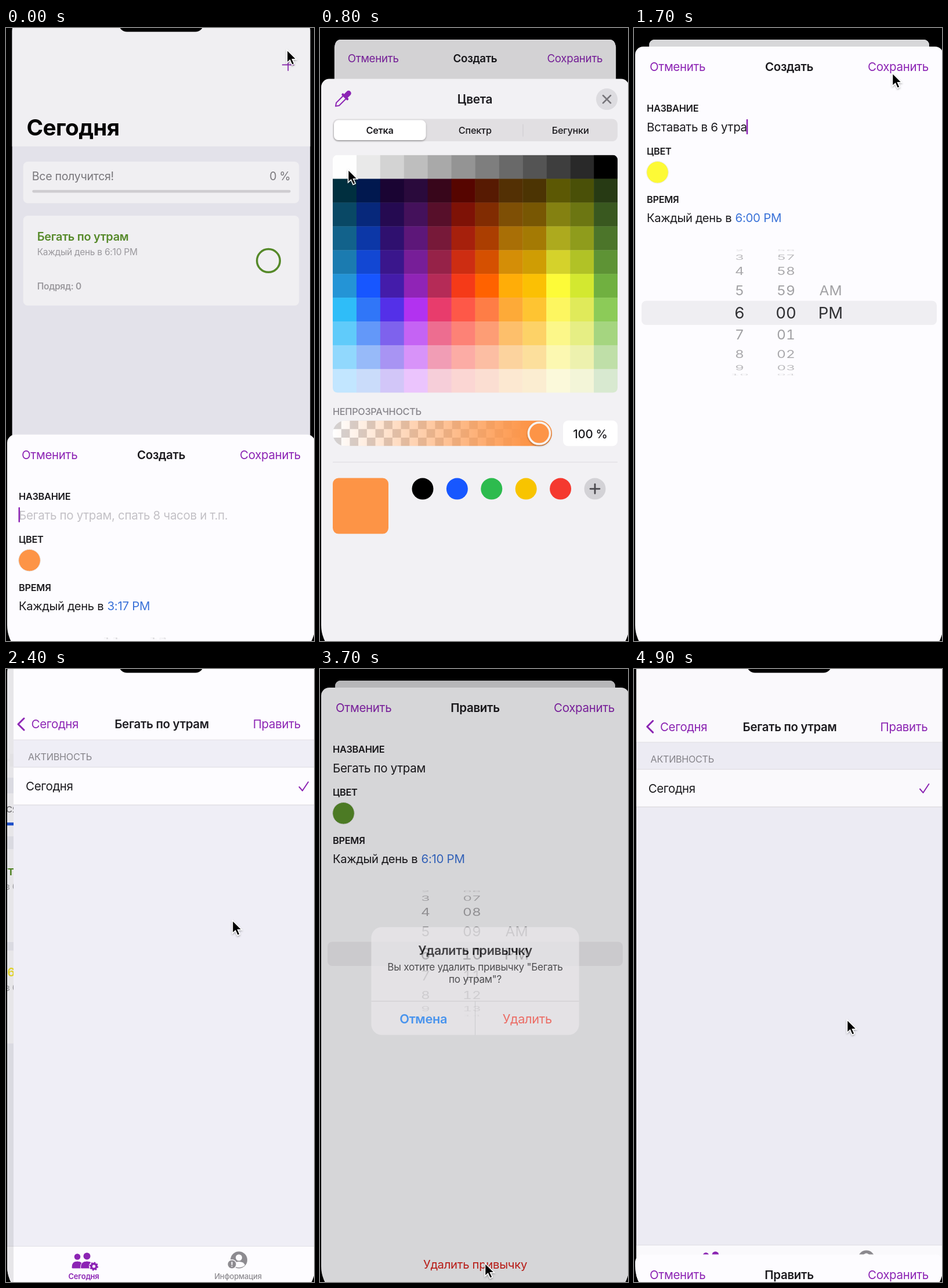
These frames come from a looping animation (531 by 1055 pixels, 5 s). An HTML page:

```html
<!DOCTYPE html>
<html lang="ru">
<head>
<meta charset="utf-8">
<title>Трекер привычек</title>
<style>
html, body { margin: 0; width: 100%; height: 100%; overflow: hidden; background: #000; }
svg { display: block; width: 100%; height: 100%; }
text { font-family: Inter, Roboto, sans-serif; letter-spacing: -.015em; white-space: pre; }
.wheel text { font-variant-numeric: tabular-nums; letter-spacing: 0; }
</style>
</head>
<body>
<svg viewBox="0 0 531 1055">
  <defs>
    <clipPath id="screen"><rect x="2" y="-50" width="531" height="1138" rx="60"/></clipPath>
    <clipPath id="grid"><rect x="22" y="131" width="491" height="409" rx="8"/></clipPath>
    <clipPath id="slider"><rect x="22" y="588" width="378" height="44" rx="22"/></clipPath>
    <pattern id="checker" x="22" y="588" width="29.4" height="29.4" patternUnits="userSpaceOnUse">
      <path fill="#fff" d="M0 0h30v30H0z"/>
      <path fill="#d3d1d2" d="M0 0h14.7v14.7H0zM14.7 14.7h14.7v14.7H14.7z"/>
    </pattern>
    <filter id="shadow" x="-50%" y="-50%" width="200%" height="200%">
      <feDropShadow dx="0" dy="1.5" stdDeviation="1.5" flood-opacity=".35"/>
    </filter>
  </defs>
  <g id="stage"></g>
</svg>
<script>
const LOOP = 5000, STEP = 100, MID = 267.5, WIDTH = 531;
const WHITE = '#fdfcff', PAGE = '#efeef6', INK = '#1b1a1e', PURPLE = '#8c24b4', BLUE = '#3a72d8';
const GREEN = '#5a902b', ORANGE = '#fd9446', YELLOW = '#fdfa36', GREY = '#86848a';
const HABIT = 'Бегать по утрам', NEW_HABIT = 'Вставать в 6 утра';
const stage = document.getElementById('stage');

const clamp = v => Math.max(0, Math.min(1, v));
const smooth = v => (v = clamp(v), v * v * (3 - 2 * v));
const mix = (a, b, k) => a + (b - a) * k;
const settle = (t, start) => t < start ? 0 : 1 - Math.exp(-.026 * (t - start));
const shown = (t, start, end) => settle(t, start) * (1 - settle(t, end));

const rect = (x, y, w, h, fill, r = 0, more = '') =>
  `<rect x="${x}" y="${y}" width="${w}" height="${h}" rx="${r}" fill="${fill}" ${more}/>`;
const circle = (x, y, r, fill, more = '') => `<circle cx="${x}" cy="${y}" r="${r}" fill="${fill}" ${more}/>`;
const line = (d, color, width, more = '') =>
  `<path d="${d}" fill="none" stroke="${color}" stroke-width="${width}" stroke-linecap="round" stroke-linejoin="round" ${more}/>`;
const group = (more, ...parts) => `<g ${more}>${parts.join('')}</g>`;
const move = (x, y, s = 1) => `transform="translate(${x} ${y}) scale(${s})"`;
// y is the middle of the capital letters
const text = (x, y, str, size, fill, weight = 400, anchor = 'start', more = '') =>
  `<text x="${x}" y="${y + size * .364}" font-size="${size}" fill="${fill}" font-weight="${weight}" text-anchor="${anchor}" ${more}>${str}</text>`;
const shade = (opacity, width = WIDTH + 4) => rect(0, -60, width, 1260, '#000', 0, `opacity="${opacity}"`);

function habitCard(y, name, time, color, done) {
  const mark = done ? line(`M449 ${y + 81}l7 7l13 -15`, '#fff', 3.5) : '';
  return rect(22, y, 491, 160, WHITE, 8) +
    text(46.7, y + 37.5, name, 20.5, color, 600) +
    text(46.7, y + 64, `Каждый день в ${time}`, 16, '#a3a1a6') +
    text(46.7, y + 125.5, `Подряд: ${done ? 1 : 0}`, 16, '#a3a1a6', 600) +
    circle(458.5, y + 80, 20.5, done ? color : 'none', `stroke="${color}" stroke-width="3.6"`) + mark;
}

function today(t, push) {
  const added = t >= 1800, done = t >= 2100;
  return rect(2, -50, WIDTH, 1200, PAGE) + rect(2, -50, WIDTH, 237, WHITE) +
    group(`opacity="${1 - push}"`,
      line('M483.5 42h20M493.5 32v20', PURPLE, 1.8),
      text(28, 153, 'Сегодня', 40, '#050505', 700)) +
    rect(22, 214, 491, 74, WHITE, 8) +
    text(37.5, 240, 'Все получится!', 20.2, '#7f7d82') +
    text(497.6, 240, done ? '50 %' : '0 %', 20.2, '#7f7d82', 400, 'end') +
    rect(38, 264.3, 460, 5, '#d9d7db', 2.5) +
    (done ? rect(38, 264.3, 230, 5, '#1f55dd', 2.5) : '') +
    habitCard(310, HABIT, '6:10 PM', GREEN, done) +
    (added ? habitCard(484.5, NEW_HABIT, '6:00 PM', '#f4e52c', false) : '');
}

function detail(k) {
  const content = rect(2, -50, WIDTH, 1200, PAGE) + rect(2, -50, WIDTH, 172, WHITE) +
    rect(2, 121.5, WIDTH, 1, '#e2e0e6') +
    text(27, 151, 'АКТИВНОСТЬ', 16.2, GREY) +
    rect(2, 169, WIDTH, 65, WHITE) + rect(2, 168.5, WIDTH, 1, '#dddbe1') + rect(2, 233.5, WIDTH, 1, '#d8d6dc') +
    text(23, 202, 'Сегодня', 20.5, INK) + line('M494.5 203l5.5 6.5l10 -15', PURPLE, 2);
  const nav = line('M31 85l-10 10l10 10', PURPLE, 3) + text(43.5, 95, 'Сегодня', 20.5, PURPLE) +
    text(268.5, 95, HABIT, 20.5, INK, 600, 'middle') + text(508, 95, 'Править', 20.5, PURPLE, 400, 'end');
  return group(move((1 - k) * WIDTH, 0), content) + group(`opacity="${k}"`, nav);
}

function tabBar() {
  const person = (x, y, r, w) => circle(x, y, r, PURPLE) +
    `<path fill="${PURPLE}" stroke="${WHITE}" d="M${x - w} 1030q0 -11 ${w} -11t${w} 11q0 2 -2 2h${4 - 2 * w}q-2 0 -2 -2z"/>`;
  return rect(2, 993, WIDTH, 100, WHITE) + rect(2, 993, WIDTH, .8, '#dcdae0') +
    person(123, 1011.5, 5.3, 10) + person(139.5, 1010.5, 6, 11) +
    circle(151.5, 1028, 8.5, WHITE) +
    circle(151.5, 1028, 4.4, 'none', `stroke="${PURPLE}" stroke-width="3.6"`) +
    circle(151.5, 1028, 6.6, 'none', `stroke="${PURPLE}" stroke-width="2" stroke-dasharray="2.6 2.58"`) +
    circle(401.5, 1017, 14.5, '#8d8b90') + circle(401.5, 1013, 5.5, WHITE) +
    `<path fill="${WHITE}" d="M391 1026q2 -6 10.5 -6t10.5 6q-4 4 -10.5 4t-10.5 -4z"/>` +
    circle(389.5, 1024.5, 8.5, WHITE) + circle(389.5, 1024.5, 7, '#8d8b90') +
    line('M389.5 1021v4M389.5 1028v.1', WHITE, 2) +
    text(134, 1045, 'Сегодня', 13, PURPLE, 600, 'middle') +
    text(400, 1045, 'Информация', 13, '#8d8b90', 500, 'middle');
}

function wheel(x, value, label) {
  let out = '';
  for (let i = Math.ceil(value - 4.3); i <= value + 4.3; i++) {
    const str = label(i), angle = (i - value) * .36, near = Math.abs(i - value) < .5;
    if (!str) continue;
    const squash = Math.max(0, Math.cos(angle));
    out += `<g transform="translate(${x} ${458 + 108 * Math.sin(angle)}) scale(1 ${squash})" opacity="${near ? 1 : .46 * Math.sqrt(squash)}">` +
      text(0, 0, str, near ? 27.5 : 24.5, '#303033', 400, 'middle') + '</g>';
  }
  return group('class="wheel"', out);
}

const wrap = (n, size) => ((n % size) + size) % size;
const hourLabel = n => String(wrap(n - 1, 12) + 1);
const minuteLabel = n => String(wrap(n, 60)).padStart(2, '0');

function form({ title, name, color, hour, minute, caret, removable }) {
  const time = `${hourLabel(Math.round(hour))}:${minuteLabel(Math.round(minute))} PM`;
  return rect(2, 0, WIDTH, 1250, WHITE, 14) +
    text(27, 35, 'Отменить', 20.5, PURPLE) + text(MID, 35, title, 20.5, INK, 600, 'middle') +
    text(508, 35, 'Сохранить', 20.5, PURPLE, 400, 'end') +
    text(22, 106, 'НАЗВАНИЕ', 16.3, INK, 600) +
    (name ? text(22, 139, name, 20.5, INK, 400, 'start', 'id="name"')
          : text(22, 139, 'Бегать по утрам, спать 8 часов и т.п.', 20.5, '#c3c1c6')) +
    (caret ? rect(21.5, 125, 2.5, 26, PURPLE, 1, 'id="caret"') : '') +
    text(22, 180, 'ЦВЕТ', 16.3, INK, 600) + circle(40.5, 216.3, 18.8, color, 'stroke="#e9e7ec"') +
    text(22, 263, 'ВРЕМЯ', 16.3, INK, 600) +
    text(22, 295, 'Каждый день в', 20.2, INK) + text(174.5, 295, time, 20.5, BLUE) +
    rect(13, 437.5, 509, 41.5, '#efeef2', 8) +
    wheel(182, hour, hourLabel) + wheel(262, minute, minuteLabel) +
    wheel(339, 1, i => ['AM', 'PM'][i]) +
    (removable ? text(MID, 993, 'Удалить привычку', 20.3, '#d8211b', 400, 'middle') : '');
}

// Swatch anchors: each palette row blends between the nearest two.
const anchors = [
  [1, '002f3f 01184f 1a0433 2a0a3c 38061b 560500 571a02 533004 4c3403 5c5804 4a5008 273a14'],
  [5, '2494d6 1756ff 441caa 9024b6 b52b57 f53a18 ff6200 ffad08 fbc004 fdfb38 d3e830 70b040'],
  [6, '2fbdf8 3076f8 5430e8 b232f0 e83c6c fe5848 fe7d46 fdaa38 fec432 fdf660 e0ea5a 8ccb58'],
  [9, 'c2e6ff cadcfa d2c6f8 ebc4fd f6ced9 fbd6d3 fbded2 fce8d1 fbedd1 fbf9da f3f5d8 d8e9d0']
].map(([row, list]) => ({ row, colors: list.split(' ').map(c => [0, 2, 4].map(i => parseInt(c.slice(i, i + 2), 16))) }));

function swatch(col, row) {
  if (!row) {
    const v = col === 11 ? 0 : 254 - 21.3 * col;
    return `rgb(${v},${v},${v})`;
  }
  const next = Math.max(1, anchors.findIndex(a => a.row >= row));
  const a = anchors[next - 1], b = anchors[next], k = (row - a.row) / (b.row - a.row);
  return `rgb(${a.colors[col].map((v, i) => Math.round(mix(v, b.colors[col][i], k)))})`;
}

const cell = 491 / 12;
let palette = '';
for (let row = 0; row < 10; row++)
  for (let col = 0; col < 12; col++)
    palette += rect(22 + col * cell, 131 + row * cell, cell + .4, cell + .4, swatch(col, row));

function colorPicker(color) {
  const saved = ['#000', '#1757ff', '#2dbb4e', '#f8c400', '#f5392f', '#d3d2d6'];
  return rect(2, 0, WIDTH, 1250, '#f2f1f4', 14) +
    group(`transform="translate(39 35) rotate(45)"`,
      rect(-4.5, -19, 9, 14, PURPLE, 4.5), rect(-7.5, -8, 15, 4, PURPLE, 2),
      line('M-3.5 -4v16l3.5 5l3.5 -5v-16', PURPLE, 2)) +
    text(267, 35, 'Цвета', 20.8, INK, 600, 'middle') +
    circle(494.5, 35, 18.5, '#dddce0') + line('M488 28.5l13 13M501 28.5l-13 13', '#77757a', 2.8) +
    rect(22, 69, 491, 38.5, '#e1dfe2', 9) +
    rect(24, 71, 158.5, 34.5, '#fff', 8, 'filter="url(#shadow)"') + rect(349.5, 78, 1, 21, '#cbc9ce') +
    ['Сетка', 'Спектр', 'Бегунки'].map((s, i) => text(103 + 164.3 * i, 88, s, 16.3, INK, i ? 500 : 600, 'middle')).join('') +
    group('clip-path="url(#grid)"', palette) +
    text(22, 572, 'НЕПРОЗРАЧНОСТЬ', 16.2, GREY, 500) +
    `<linearGradient id="alpha"><stop stop-color="${color}" stop-opacity="0"/><stop offset=".9" stop-color="${color}"/></linearGradient>` +
    group('clip-path="url(#slider)"', rect(22, 588, 378, 44, 'url(#checker)'), rect(22, 588, 378, 44, 'url(#alpha)')) +
    circle(378, 610, 18.5, color, 'stroke="#f7f3f2" stroke-width="3.5" filter="url(#shadow)"') +
    rect(419, 588, 94, 44, '#fff', 9) + text(466, 610.5, '100 %', 20.5, INK, 500, 'middle') +
    rect(22, 659, 491, 1, '#dcdadf') + rect(22, 687, 96, 96, color, 10) +
    saved.map((c, i) => circle(177 + 59.4 * i, 705.5, 18.5, c)).join('') +
    line('M466 705.5h16M474 697.5v16', '#4b494e', 2.8);
}

function alertBox(k) {
  const s = mix(1.1, .975, k);
  return shade(.21 * k) + group(`opacity="${k}" transform="translate(267.5 537) scale(${s}) translate(-267.5 -537)"`,
    rect(90, 445, 355, 184, '#eae8eb', 18, 'fill-opacity=".95"'),
    text(MID, 485, 'Удалить привычку', 21.3, '#131215', 600, 'middle'),
    text(MID, 513, 'Вы хотите удалить привычку "Бегать', 17, '#1d1c1f', 400, 'middle'),
    text(MID, 534, 'по утрам"?', 17, '#1d1c1f', 400, 'middle'),
    rect(90, 571, 355, 1, '#c8c6ca'), rect(267, 571, 1, 58, '#c8c6ca'),
    text(179, 601, 'Отмена', 21.6, '#167cf5', 600, 'middle'),
    text(356.5, 601, 'Удалить', 21.6, '#f4473c', 400, 'middle'));
}

const pointer = [
  [0, 484, 37], [400, 484, 37], [700, 48, 243], [800, 48, 243], [1000, 412, 387], [1100, 412, 387],
  [1200, 494, 66], [1350, 182, 500], [1450, 182, 410], [1520, 262, 500], [1600, 262, 440], [1700, 445, 77],
  [1800, 445, 77], [2000, 458, 388], [2100, 458, 388], [2200, 390, 432], [2450, 390, 432], [2700, 470, 91],
  [2950, 470, 91], [3400, 284, 1022], [3800, 284, 1022], [4300, 367, 603], [5000, 367, 603]
];

function cursor(t) {
  const i = pointer.findIndex(p => p[0] > t), [t0, x0, y0] = pointer[i - 1], [t1, x1, y1] = pointer[i];
  const k = smooth((t - t0) / (t1 - t0));
  return `<path ${move(mix(x0, x1, k) + .5, mix(y0, y1, k) + .8)} filter="url(#shadow)" fill="#000" stroke="#fff" stroke-width="1.5" d="M0 0v22l5 -4.6l3.6 8.2l4 -1.7l-3.6 -8h7z"/>`;
}

function basePage(t, raised) {
  const s = 1 - .091 * raised, push = settle(t, 2251), r = mix(45, 10, raised);
  const pages = push > .9999 ? detail(1)
    : group(move(-.3 * WIDTH * push, 0), today(t, push)) + (push ? detail(push) : '');
  const strip = push ? shade(.09 * push, 2 + (1 - push) * WIDTH) : '';
  return group(move(MID * (1 - s), 50 * s - 50 + 70 * raised, s),
    `<clipPath id="page"><rect x="2" y="-50" width="${WIDTH}" height="1200" rx="${r}"/></clipPath>`,
    group('clip-path="url(#page)"', pages, tabBar(), strip, shade(.15 * raised)));
}

function sheet(raised, content, nested = 0) {
  if (raised < .001) return '';
  const s = 1 - .091 * nested, y = 1055 - 1023 * raised - 12 * nested;
  const dim = nested ? rect(2, 0, WIDTH, 1250, '#000', 14, `opacity="${.18 * nested}"`) : '';
  return group(move(MID * (1 - s), y, s), content, dim);
}

function draw(t) {
  const create = shown(t, -16.4, 1775), edit = shown(t, 2778, 4782);
  // The page behind comes back slightly after its sheet drops.
  const raised = Math.max(shown(t, -16.4, 1793), shown(t, 2778, 4800));
  const picker = shown(t, 688, 1180), alert = shown(t, 3650, 4660);
  const color = t < 1050 ? ORANGE : YELLOW;
  const typed = NEW_HABIT.slice(0, Math.max(0, Math.floor((t - 150) / 26)));
  stage.innerHTML = group('clip-path="url(#screen)"',
    basePage(t, raised),
    sheet(create, form({
      title: 'Создать', name: typed, color, caret: true,
      hour: mix(3, 6, smooth((t - 1340) / 120)), minute: mix(17, 0, smooth((t - 1480) / 150))
    }), picker),
    sheet(picker, colorPicker(color)),
    sheet(edit, form({ title: 'Править', name: HABIT, color: GREEN, hour: 6, minute: 10, removable: true })),
    alert > .01 ? alertBox(alert) : '') +
    rect(194.5, -30, 146, 36.5, '#000', 14) + cursor(t);
  const caret = document.getElementById('caret'), name = document.getElementById('name');
  if (caret && name) caret.setAttribute('x', 21 + name.getComputedTextLength());
}

const start = performance.now();
let last = -1;
function tick() {
  const t = Math.floor((performance.now() - start) % LOOP / STEP) * STEP;
  if (t !== last) draw(last = t);
  requestAnimationFrame(tick);
}
tick();
</script>
</body>
</html>
```
